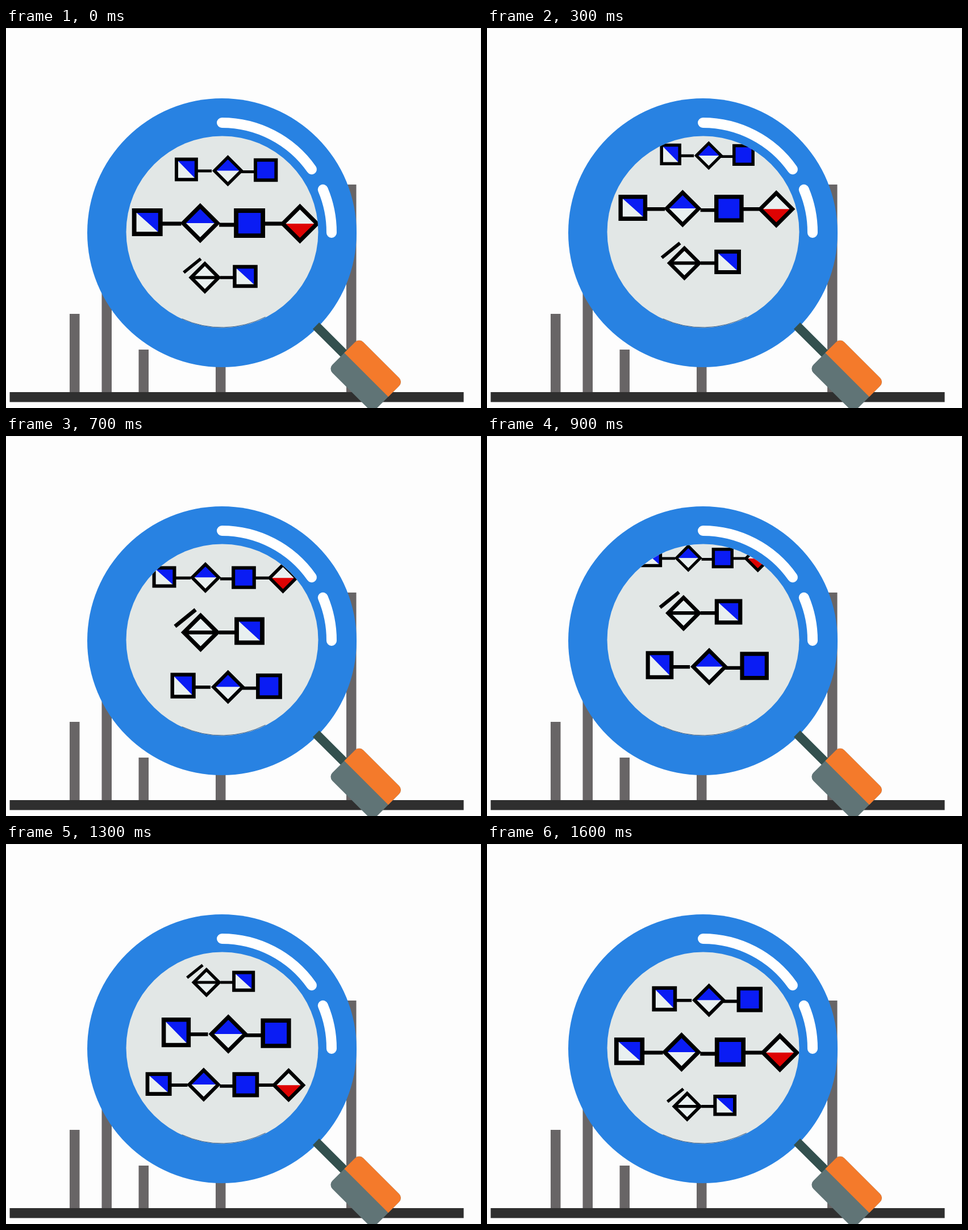
These frames come from a looping animation (836 px wide and 670 px high, 1.7 s). An HTML page with a canvas:

```html
<!DOCTYPE html>
<html lang="en">
<head>
<meta charset="utf-8">
<title>Symbol chains under a magnifier</title>
<style>
  html, body { margin: 0; width: 100%; height: 100%; overflow: hidden; background: #fdfdfd; }
  canvas { display: block; }
</style>
</head>
<body>
<canvas id="stage" width="836" height="670"></canvas>
<script>
const ctx = document.getElementById('stage').getContext('2d');
const LOOP = 1700, STEP = 100, LAP = 281, TOP = 206.5;
const BLUE = '#0a1cf4', RED = '#de0303', PALE = '#e9f0f0', LENS = '#e2e7e6', RING = '#2882e2';

function rect(color, x, y, w, h) {
  ctx.fillStyle = color;
  ctx.fillRect(x, y, w, h);
}

function polygon(points, fill, stroke) {
  ctx.beginPath();
  points.forEach(([x, y]) => ctx.lineTo(x, y));
  ctx.closePath();
  if (fill) { ctx.fillStyle = fill; ctx.fill(); }
  if (stroke) { ctx.lineWidth = stroke; ctx.stroke(); }
}

function line(x1, y1, x2, y2) {
  ctx.lineWidth = 7;
  ctx.beginPath();
  ctx.moveTo(x1, y1);
  ctx.lineTo(x2, y2);
  ctx.stroke();
}

// Sizes are outer sizes, including the outline.
function square(x, y, w, h, full) {
  const a = (w - 8) / 2, b = (h - 8) / 2;
  const tl = [x - a, y - b], tr = [x + a, y - b], br = [x + a, y + b], bl = [x - a, y + b];
  const all = [tl, tr, br, bl];
  polygon(all, full ? BLUE : PALE);
  if (!full) polygon([tl, tr, br], BLUE);
  polygon(all, null, 8);
}

function diamond(x, y, half, top, bottom) {
  const r = half - 5.3;
  const left = [x - r, y], right = [x + r, y], up = [x, y - r], down = [x, y + r];
  polygon([left, up, right], top);
  polygon([left, down, right], bottom);
  polygon([left, up, right, down], null, 7.5);
}

function chainOfThree() {
  line(-68, 0, -34, 0);
  line(35, 2, 68, 2);
  square(-93.5, -3.5, 54.5, 55.5);
  diamond(4, -0.5, 37, BLUE, PALE);
  square(93, -2, 56.5, 55.5, true);
}

function chainOfFour() {
  line(-112, 0, -76, 0);
  line(-8, 2, 22, 2);
  line(72, 0, 105, 0);
  square(-137, -2.5, 55, 50);
  diamond(-42, -1, 36, BLUE, PALE);
  square(46.5, -1, 56, 53, true);
  diamond(137, 0, 36, PALE, RED);
}

function chainOfTwo() {
  line(-11, 0, 20, 0);
  line(-90, -11, -53, -41);
  diamond(-44, 0, 35.5, PALE, PALE);
  line(-75, 0, -13, 0);
  square(44, -2.5, 54, 50);
}

// Distance scrolled: a slow start, a steady run, then a faster finish.
function travel(time) {
  const slow = Math.min(time, 300) * 26 / 300;
  const steady = Math.max(0, time - 300) * 0.174;
  const extra = Math.max(0, time - 1300) * 0.019 + Math.max(0, time - 1600) * 0.04;
  return slow + steady + extra;
}

// A chain scrolls up, re-enters below, and is largest near the middle of the lens.
function drawChain(draw, x, home, pace, middle, time) {
  let y = home - pace * travel(time);
  if (y < TOP) y += pace * LAP;
  const scale = 1 - 0.0023 * Math.abs(y - middle);
  ctx.save();
  ctx.translate(x, y);
  ctx.scale(scale, scale);
  ctx.strokeStyle = '#000';
  draw();
  ctx.restore();
}

function circle(x, y, r) {
  ctx.beginPath();
  ctx.arc(x, y, r, 0, Math.PI * 2);
}

function disc(x, y, r, color) {
  circle(x, y, r);
  ctx.fillStyle = color;
  ctx.fill();
}

function arc(r, from, to, color, width) {
  ctx.beginPath();
  ctx.arc(380, 360, r, from, to);
  ctx.strokeStyle = color;
  ctx.lineWidth = width;
  ctx.lineCap = 'round';
  ctx.stroke();
  ctx.lineCap = 'butt';
}

function roundRect(color, x, y, w, h, radii) {
  ctx.beginPath();
  ctx.roundRect(x, y, w, h, radii);
  ctx.fillStyle = color;
  ctx.fill();
}

function drawChart() {
  rect('#fdfdfd', 0, 0, 836, 670);
  rect('#f0f0f0', 0, 0, 836, 1);
  rect('#f0f0f0', 835, 0, 1, 670);
  for (const [x, top] of [[112, 504], [168.5, 440], [233.5, 567], [369, 560], [599, 276]])
    rect('#686566', x, top, 17.5, 643 - top);
  rect('#2f2f2f', 6.5, 642, 799, 17.5);
}

function drawLens(time) {
  disc(380, 361, 237, RING);
  disc(380.5, 359.5, 169, LENS);
  ctx.save();
  circle(380.5, 359.5, 169);
  ctx.clip();
  drawChain(chainOfThree, 387.5, 252, 1.03, 361, time);
  drawChain(chainOfFour, 383, 345, 0.99, 353.5, time);
  drawChain(chainOfTwo, 385.5, 440, 0.98, 356, time);
  ctx.restore();
  arc(168, 1.1, 2, '#3d5f86', 1);
  arc(193, -Math.PI / 2, -0.612, '#fff', 18);
  arc(193, -0.4, 0.005, '#fff', 18);
}

function drawHandle() {
  ctx.save();
  ctx.rotate(Math.PI / 4);
  rect('#33504e', 757, -22.5, 72, 16);
  roundRect('#607476', 826, -53, 109.5, 76.7, 10);
  roundRect('#f47a2b', 826, -53, 109.5, 37, [10, 10, 0, 0]);
  ctx.restore();
}

function frame(now) {
  const time = Math.floor((now % LOOP) / STEP) * STEP;
  drawChart();
  drawLens(time);
  drawHandle();
  requestAnimationFrame(frame);
}
requestAnimationFrame(frame);
</script>
</body>
</html>
```
